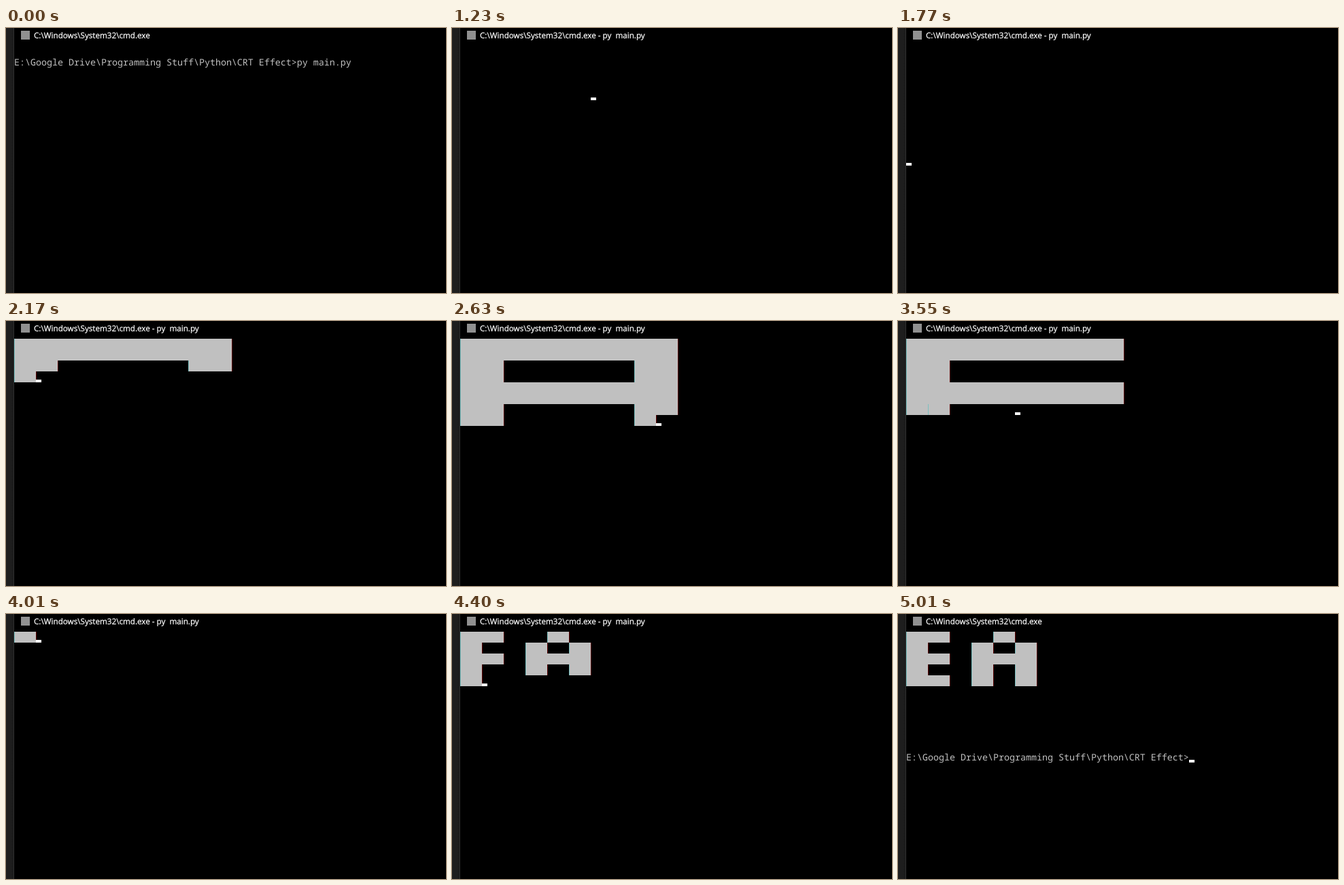
Recreate the animation shown at these times as an HTML page. Size 647 by 389 pixels, loop 5.85 s.

```html
<!DOCTYPE html>
<html lang="en">
<head>
<meta charset="utf-8">
<title>Console drawing</title>
<style>
  html, body { margin: 0; width: 100%; height: 100%; overflow: hidden; background: #000; }
  svg { display: block; width: 647px; height: 389px; shape-rendering: crispEdges; }
  text { white-space: pre; text-rendering: geometricPrecision; }
  #title { font: 11.66px "Open Sans", "Noto Sans", sans-serif; fill: #fff; stroke: #fff; stroke-width: .25px; }
  #prompt { font: 13.333px "Noto Sans Mono", "Liberation Mono", monospace; fill: #c0c0c0; }
</style>
</head>
<body>
<svg viewBox="0 0 647 389">
  <defs>
    <linearGradient id="shade">
      <stop offset=".6" stop-color="#1e1e1e"/>
      <stop offset="1" stop-color="#1a1a1a"/>
    </linearGradient>
  </defs>
  <rect width="647" height="389" fill="#000"/>
  <rect width="12" height="389" fill="url(#shade)"/>
  <rect x="11" width="1" height="389" fill="#303030"/>
  <rect x="22" y="4" width="13" height="13" fill="#909090"/>
  <text id="title" x="41" y="15"></text>
  <path id="blocks" fill="#c0c0c0"/>
  <path id="leftFringe" fill="#7ac0c0"/>
  <path id="rightFringe" fill="#560000"/>
  <text id="prompt" x="12"></text>
  <rect id="cursor" width="8" height="4" fill="#fff"/>
</svg>
<script>
const LOOP = 5850, TICK = 77.08, TICK_SHIFT = 4;
const LEFT = 12, TOP = 26, CHAR = 8, ROW = 16, CELL = 32, SIZE = 10;
const CELLS_PER_TICK = 8.1;
const PATH = 'E:\\Google Drive\\Programming Stuff\\Python\\CRT Effect>';
const COMMAND = 'py main.py';
const TITLE = 'C:\\Windows\\System32\\cmd.exe';

const doubled = rows => rows.flatMap(row => {
  const wide = [...row].map(c => c + c).join('');
  return [wide, wide];
});

// Each pass scans a 10 by 10 picture, cell by cell, from its starting tick.
const passes = [
  { start: 10.32, rows: [] },
  { start: 24.17, rows: doubled(['#####', '#...#', '#####', '#...#', '#...#']) },
  { start: 37.95, rows: doubled(['#####', '#....', '#####', '#....', '#####']), seam: [6, 1] },
  { start: 51.87, rows: ['##..#.', '#..#.#', '##.###', '#..#.#', '##.#.#'] }
];

const el = id => document.getElementById(id);
const box = (x, y, w) => `M${x} ${y}h${w}v${ROW}h${-w}z`;

function drawPicture(pass, count) {
  let fill = '', left = '', right = '';
  const lit = (row, col) =>
    row * SIZE + col < count && pass.rows[row]?.[col] === '#';
  for (let i = 0; i < count; i++) {
    const row = Math.floor(i / SIZE), col = i % SIZE;
    if (!lit(row, col)) continue;
    const x = LEFT + col * CELL, y = TOP + row * ROW;
    const seam = pass.seam && row === pass.seam[0] && col === pass.seam[1];
    fill += box(x, y, CELL);
    if (seam || !lit(row, col - 1)) left += box(x, y, 1);
    if (!lit(row, col + 1)) right += box(x + CELL, y, 1);
  }
  el('blocks').setAttribute('d', fill);
  el('leftFringe').setAttribute('d', left);
  el('rightFringe').setAttribute('d', right);
}

function setPrompt(text, row) {
  el('prompt').textContent = text;
  el('prompt').setAttribute('y', TOP + row * ROW + 13);
}

function setCursor(col, row, visible = true) {
  const cursor = el('cursor');
  cursor.setAttribute('x', LEFT + col * CHAR);
  cursor.setAttribute('y', TOP + row * ROW + 12);
  cursor.setAttribute('visibility', visible ? 'visible' : 'hidden');
}

function render(tick) {
  const running = tick >= 8 && tick < 65;
  el('title').textContent = TITLE + (running ? ' - py  main.py' : '');

  const pass = passes.findLast(p => p.start <= tick);
  const count = pass
    ? Math.min(SIZE * SIZE, Math.floor((tick - pass.start) * CELLS_PER_TICK))
    : 0;
  drawPicture(pass, count);

  if (!pass) {
    setPrompt(PATH + COMMAND, 1);
    if (tick < 7) setCursor(PATH.length + COMMAND.length, 1, tick > 0);
    else setCursor(0, 2);
  } else if (running) {
    setPrompt('', 0);
    setCursor(count % SIZE * CELL / CHAR, Math.floor(count / SIZE));
  } else {
    setPrompt(PATH, 11);
    setCursor(PATH.length, 11);
  }
}

let shown = -1;
function play() {
  const tick = Math.floor((performance.now() % LOOP + TICK_SHIFT) / TICK);
  if (tick !== shown) render(shown = tick);
  requestAnimationFrame(play);
}
play();
</script>
</body>
</html>
```
